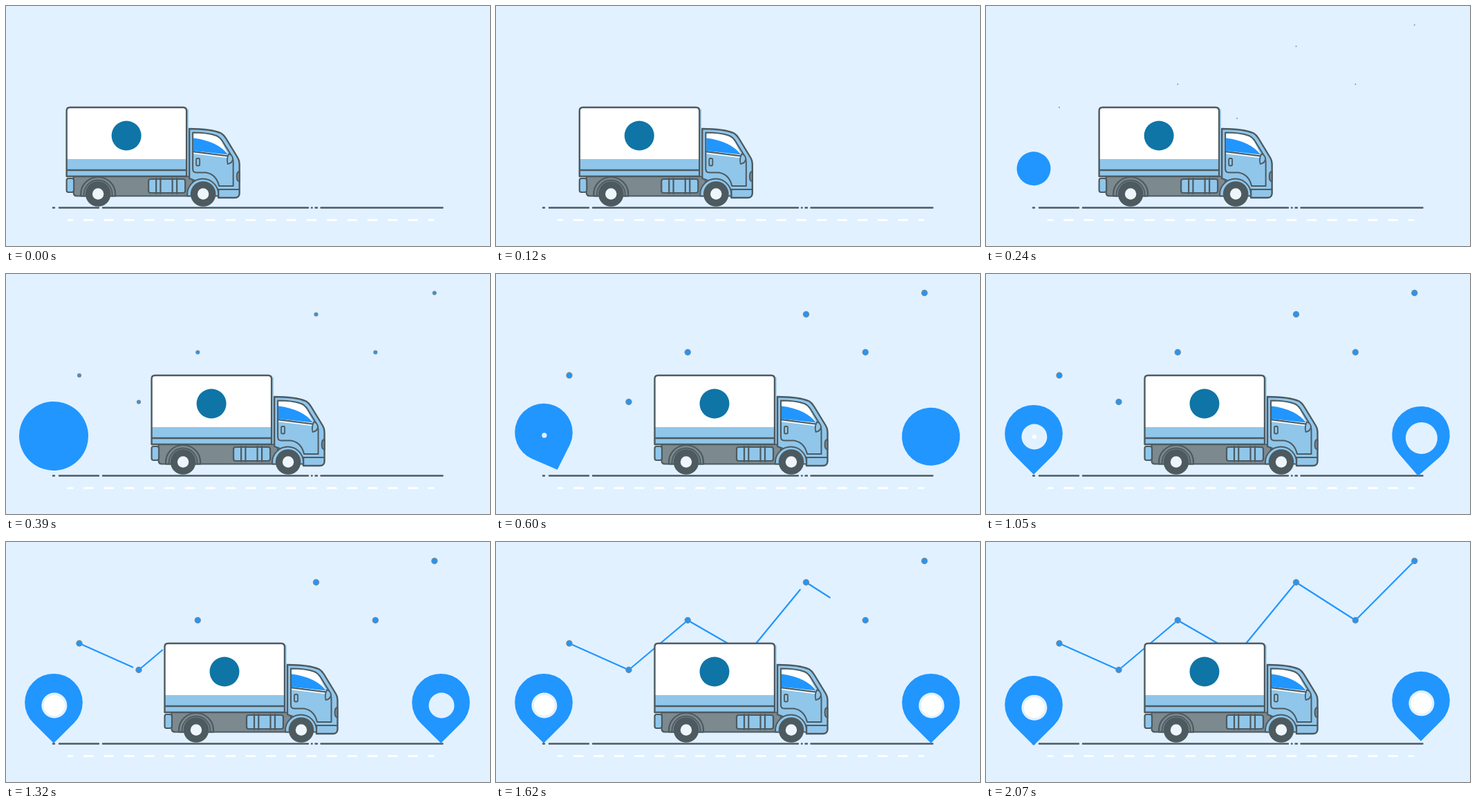
An HTML page with a canvas for the animation above (2100 ms loop, 700 px wide and 348 px high).

```html
<!DOCTYPE html>
<html lang="en">
<head>
<meta charset="utf-8">
<title>Delivery truck</title>
<style>
html, body { margin: 0; height: 100%; overflow: hidden; background: #e1f1ff; }
canvas { display: block; }
</style>
</head>
<body>
<canvas id="stage" width="700" height="348"></canvas>
<script>
const ctx = document.getElementById('stage').getContext('2d');
const SKY = '#e1f1ff', BLUE = '#2196ff', PALE = '#90c6ea', INK = '#4d5a60', GRAY = '#7c898f';
const LOOP = 2100, STEP = 30;

// Smooth curve through [time, value] points, held at both ends
function curve(t, pts) {
  const last = pts.length - 1;
  if (t <= pts[0][0]) return pts[0][1];
  if (t >= pts[last][0]) return pts[last][1];
  const i = pts.findIndex(p => p[0] > t) - 1;
  const slope = n => n < 1 || n >= last ? 0
    : (pts[n + 1][1] - pts[n - 1][1]) / (pts[n + 1][0] - pts[n - 1][0]);
  const [t0, a] = pts[i], [t1, b] = pts[i + 1], d = t1 - t0, u = (t - t0) / d, w = 1 - u;
  return w * w * (1 + 2 * u) * a + u * u * (3 - 2 * u) * b
    + u * w * w * d * slope(i) - u * u * w * d * slope(i + 1);
}

function shape(path, fill, stroke = INK, width = 2.2) {
  const p = new Path2D(path);
  if (fill) { ctx.fillStyle = fill; ctx.fill(p); }
  if (stroke) { ctx.strokeStyle = stroke; ctx.lineWidth = width; ctx.stroke(p); }
}

function disc(x, y, r, fill) {
  if (r <= 0) return;
  ctx.fillStyle = fill;
  ctx.beginPath();
  ctx.arc(x, y, r, 0, 7);
  ctx.fill();
}

function road() {
  shape('M68 292.5h2M77 292.5h57M140 292.5h297M442 292.5h.6M447.5 292.5h2.5M455.5 292.5h176', null, INK, 2.5);
  ctx.setLineDash([11.8, 17.53]);
  ctx.lineDashOffset = 5.9;
  shape('M90 310.5H618', null, '#fff', 3.2);
  ctx.setLineDash([]);
}

const stops = [[106, 147], [192, 185.5], [277.3, 113.5], [363, 163], [448.5, 58.5], [534.3, 113.5], [619.7, 27.5]];

function chart(t) {
  for (let i = 0; i < 6; i++) {
    const u = Math.min(1, (t - 1098 - i * 100) / 280);
    if (u <= 0) break;
    const k = (1 - Math.cos(Math.PI * u)) / 2, [x, y] = stops[i], [x2, y2] = stops[i + 1];
    shape(`M${x} ${y}L${x + (x2 - x) * k} ${y + (y2 - y) * k}`, null, BLUE, 2.2);
  }
  const r = curve(t, [[215, 0], [240, .9], [390, 3.1], [600, 4.7]]);
  for (const [x, y] of stops) {
    disc(x, y, r, GRAY);
    disc(x, y, r - 1.3, BLUE);
  }
}

const holeSize = t => curve(t, [[585, 0], [600, 3.6], [750, 23], [850, 19], [950, 18.5]]);

function pin(x, t) {
  const r = curve(t, [[180, 0], [240, 24.5], [300, 42], [390, 50], [435, 52.3], [540, 45], [600, 41.8]]);
  if (r <= 0) return;
  const bob = -3.2 * Math.sin(2 * Math.PI * (t - 1620) / 600);
  const tail = curve(t, [[470, 1], [600, 1.38], [700, 1.415]]);
  const turn = curve(t, [[450, -50], [600, -20], [700, 4], [750, 4], [900, 0]]);
  const a = Math.acos(1 / tail), down = Math.PI / 2;
  ctx.save();
  ctx.translate(x, 232.7 + bob + Math.max(0, r - 42) * .15);
  ctx.save();
  ctx.rotate(turn * Math.PI / 180);
  ctx.fillStyle = BLUE;
  ctx.beginPath();
  ctx.arc(0, 0, r, down + a, down - a + 2 * Math.PI);
  ctx.lineTo(0, r * tail);
  ctx.fill();
  ctx.restore();
  disc(.9, 4.3, holeSize(t), SKY);
  disc(.9, 4.3, holeSize(t - 450) * .81, '#fff');
  ctx.restore();
}

function wheel(x) {
  disc(x, 272.5, 18.3, INK);
  disc(x, 272.5, 8.2, '#eef5fb');
}

function truck(t) {
  const left = t < 541 ? 77.5 * (1 - Math.sin(.00471 * (t - 208))) : 0;
  ctx.save();
  ctx.translate(142 - left, 0);

  // Chassis, rear bumper and tank
  shape('M97.5 247H270V275.5H102Q97.5 275.5 97.5 270Z', GRAY);
  shape('M90 250H95Q98 250 98 253V267Q98 270 95 270H90Q87.5 270 87.5 267V253Q87.5 250 90 250Z', PALE);
  shape('M108 275.5V273A25 25 0 0 1 158 273V275.5Z', GRAY);
  shape('M112.5 275.5V273A20.5 20.5 0 0 1 153.5 273V275.5', null, INK, 1.8);
  shape('M209 251H256Q259 251 259 254V268Q259 271 256 271H209Q206 271 206 268V254Q206 251 209 251Z', PALE);
  shape('M217 250V272M223.3 250V272M240.5 250V272M247 250V272');

  // Cargo box
  shape('M87.5 247V152Q87.5 147 92.5 147H256Q261 147 261 152V247Z', '#fff', null);
  shape('M87.5 222H261V247H87.5Z', PALE, null);
  shape('M263 150V246', null, PALE, 1.5);
  shape('M87.5 247V152Q87.5 147 92.5 147H256Q261 147 261 152V247ZM87.5 238H261', null, INK, 2.4);
  disc(174, 188, 21.5, '#0f75a6');

  // Cab
  shape('M265 247V178Q296 178 311 184.5Q315 187 318 192L335 220Q337.5 224 337.5 229V272Q337 278 331 278H307V266L265 250Z', PALE, INK, 2.4);
  shape('M271 184Q290 184 302 188Q308 190 312 197L322 217L271 210.5Z', '#fff', null);
  shape('M271 191.5Q306 196 321 215.5L271 210Z', BLUE, null);
  shape('M271 213.5L320 219.5', null, '#fff', 1.5);
  shape('M270 183.5Q292 183.5 304 188Q309 190 313 196L326 217Q328.5 221 328.5 226V261H308Q304 244 289 241.5H275Q270 241.5 270 236ZM270 211L321 217.5', null, INK, 2);
  shape('M307 266H337', null, INK, 2);
  shape('M276.5 221H278.5Q280 221 280 223V229.5Q280 231.5 278.5 231.5H276.5Q275 231.5 275 229.5V223Q275 221 276.5 221Z', PALE, INK, 1.8);
  shape('M322 214.5Q327.5 216 328 222Q327 228 320.5 229Q318.5 222 322 214.5Z', PALE, INK, 1.8);
  shape('M337.5 240Q333.5 240 333.5 247Q333.5 254.5 337.5 254.5Z', GRAY, INK, 1.8);

  // Front arch and wheels
  shape('M262 275.5V273A22.5 22.5 0 0 1 307 273V275.5Z', PALE, INK, 2);
  wheel(133);
  wheel(285);
  ctx.restore();
}

function draw(now) {
  const t = Math.floor(now % LOOP / STEP) * STEP;
  ctx.fillStyle = SKY;
  ctx.fillRect(0, 0, 700, 348);
  road();
  chart(t);
  pin(69, t);
  pin(629, t - 300 < 0 ? 0 : t - 300);
  truck(t);
  requestAnimationFrame(tick);
}

let start;
function tick(now) {
  start ??= now;
  draw(now - start);
}

ctx.lineCap = ctx.lineJoin = 'round';
draw(0);
</script>
</body>
</html>
```
